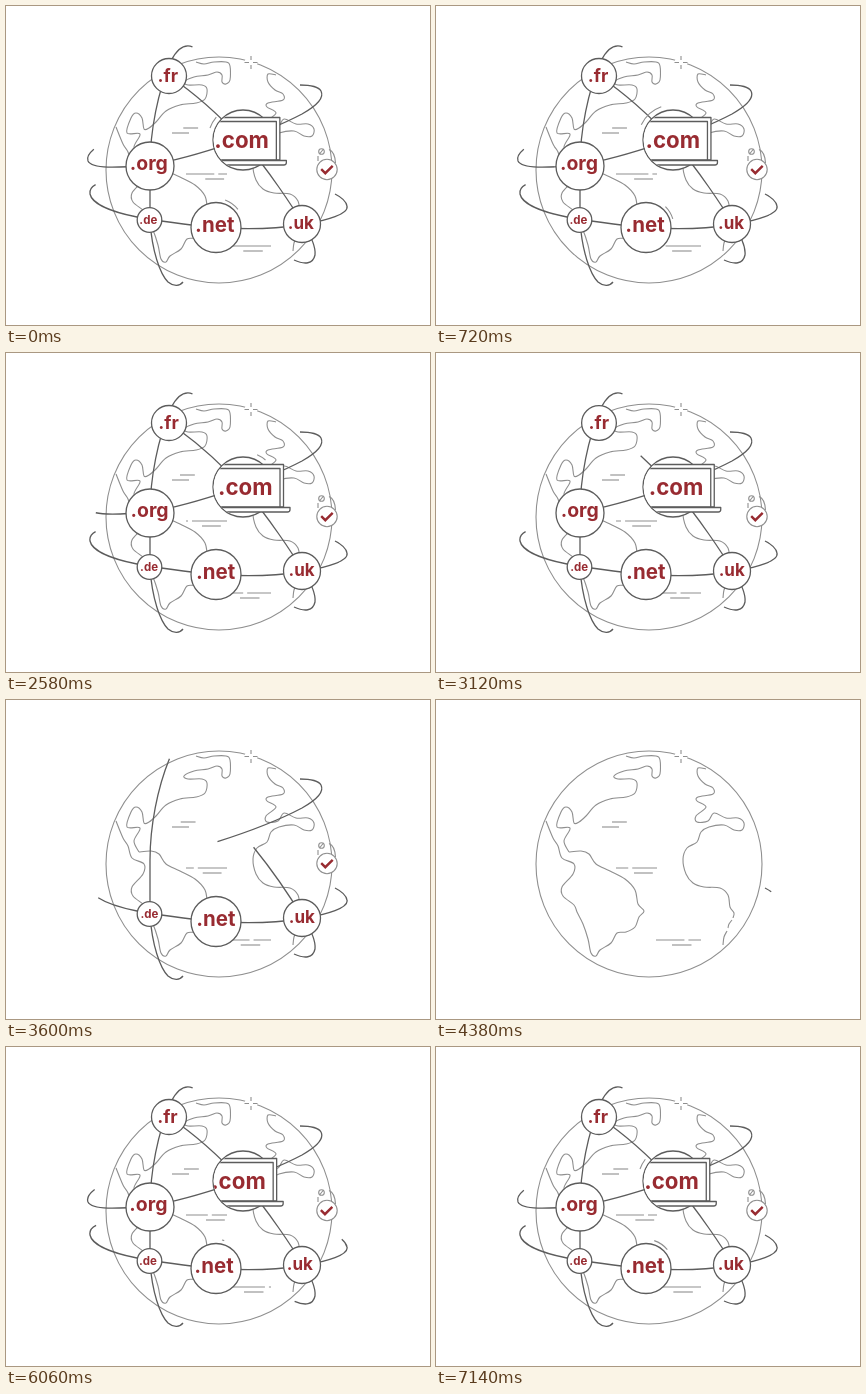
Recreate the animation shown at these times as an HTML page. Size 424 by 319 pixels, loop 7200 ms.

```html
<!DOCTYPE html>
<html lang="en">
<head>
<meta charset="utf-8">
<title>Domain globe</title>
<style>
html, body { margin: 0; width: 100%; height: 100%; overflow: hidden; background: #fff; }
svg { display: block; width: 100vw; height: 100vh; }
path, circle { fill: none; stroke-linejoin: round; }
.land { stroke: #8f8f8f; stroke-width: 1.1; }
.ink { stroke: #5c5c5c; stroke-width: 1.3; }
.disc { fill: #fff; }
text { font-family: Inter, "Open Sans", sans-serif; font-weight: 700; fill: #982b31; text-anchor: middle; }
.tick { stroke: #982b31; stroke-width: 2.4; stroke-linejoin: miter; }
</style>
</head>
<body>
<svg id="stage" viewBox="0 0 424 319"></svg>
<script>
const LOOP = 7200, RESTART = 4400;
const stage = document.getElementById('stage');

function set(node, attrs) {
  for (const key in attrs) node.setAttribute(key, attrs[key]);
}
function add(tag, attrs, parent = stage) {
  const node = document.createElementNS('http://www.w3.org/2000/svg', tag);
  set(node, attrs);
  return parent.appendChild(node);
}

const clamp = v => Math.max(0, Math.min(1, v));
const progress = (t, from, length) => clamp((t - from) / length);
const smooth = v => v * v * (3 - 2 * v);
const easeIn = v => v * v;
const easeOut = v => 1 - (1 - v) ** 3;

// Smooth curve through "x,y x,y ..." points.
function spline(list) {
  const p = list.split(' ').map(s => s.split(',').map(Number));
  let d = `M${p[0]}`;
  for (let i = 0; i < p.length - 1; i++) {
    const a = p[i - 1] || p[i], b = p[i], c = p[i + 1], e = p[i + 2] || c;
    const h1 = [0, 1].map(k => b[k] + (c[k] - a[k]) / 6);
    const h2 = [0, 1].map(k => c[k] - (e[k] - b[k]) / 6);
    d += `C${h1} ${h2} ${c}`;
  }
  return d;
}

// Show only the part of a path between two fractions.
function trim(path, start, end) {
  const len = path.getTotalLength(), span = (end - start) * len;
  path.style.display = span < 0.3 ? 'none' : '';
  set(path, { 'stroke-dasharray': `0 ${start * len} ${Math.max(0, span)} ${len * 2}` });
}

// Globe and land
add('circle', { cx: 213, cy: 164, r: 113, class: 'land' });
const coasts = {
  northAmerica: '190,56 198,58 208,56 220,56 224,60 224,74 220,78 216,76 216,69 211,66 202,69 188,71 178,76 182,79 196,79 201,83 199,93 190,97 174,99 160,105 150,116 143,122 138,123 136,112 130,107 125,112 121,127 134,128 128,141 133,152',
  southAmerica: '133,152 145,151 153,154 160,164 174,171 189,179 199,190 202,204 208,211 203,217 199,227 190,232 181,233 175,243 164,250 160,256 155,253 152,239 147,224 141,212 138,205 127,196 126,187 137,174 138,164 126,158 122,146 117,138 110,121',
  europeAfrica: '270,69 262,68 262,76 269,84 277,88 277,94 262,97 261,101 270,107 260,116 261,122 272,121 278,113 290,118 302,118 308,123 306,130 298,130 288,125 273,127 265,132 261,142 251,148 247,159 250,174 257,183 268,187 284,188 292,195 294,207 298,213 297,218',
  cape: '296,220 293,224 292,228',
  capeEnd: '291,231 288,237 287,245'
};
for (const name in coasts) add('path', { d: spline(coasts[name]), class: 'land' });

add('circle', { cx: 245, cy: 56.5, r: 6.5, class: 'disc' });
add('path', { class: 'land', d: 'M238.5 56.5h4.5M247 56.5h4.5M245 50v4M245 59v4' });

// Each patch of sea is a long line and a short one; a gap runs along the long line.
const waves = [[166, 127, 17, 176, 122], [180, 168, 41, 198, 173], [220, 240, 45, 236, 245]]
  .map(([x, y, len, x2, y2]) => ({
    len,
    long: add('path', { d: `M${x} ${y}h${len}`, class: 'land' }),
    short: add('path', { d: `M${x2} ${y2}h${12 + len / 6}`, class: 'land' })
  }));

// Lines draw themselves over "draw" ms, settle at "rest" and are erased from "out" to "until".
const orbits = [
  { d: 'M100 136C86 142 80 150 82 155C86 163 110 162 144 159C190 151 260 127 296 108C312 99 318 91 315 85C312 80 304 79 294 79',
    draw: 1650, rest: .045, out: 9100, until: 11500 },
  { d: 'M97 176C88 178 83 182 84 188C86 198 106 206 131 211C190 221 240 227 296 219C322 214 343 208 341 200C340 195 335 191 329 188',
    draw: 2370, rest: .025, out: 10480, until: 11595 },
  { d: 'M189 42C180 37 172 41 165 55C152 85 144 125 144 160V215C146 245 154 268 162 276C168 281 174 280 177 276',
    draw: 1750, rest: .01, out: 10400, until: 11560 },
  { d: 'M130 59C142 57 150 61 163 70C190 88 216 112 238 136C262 163 288 203 297 218C305 230 310 240 309 249C307 258 299 259 288 254',
    draw: 1950, rest: .12, out: 9300, until: 11560 }
];
for (const o of orbits) o.el = add('path', { d: o.d, class: 'ink' });

// Thin arcs that run around two of the nodes
const arcs = [
  { d: 'M204 122A35 35 0 0 1 259.5 107', from: 6700 },
  { d: 'M216 193A29 29 0 0 1 238 222', from: 5900 }
];
for (const a of arcs) a.el = add('path', { d: a.d, class: 'land' });

// Tag beside the badge
const tag = add('g', {});
add('circle', { cx: 315.5, cy: 145.5, r: 2.8, class: 'land' }, tag);
add('path', { d: 'M313.5 148L317.5 143M312 150v5M323 143.5Q329 146 329.5 157', class: 'land' }, tag);

const nodes = [
  { label: '.fr', x: 163, y: 70, r: 17.5, dy: 5.5, size: 18, from: 4500, gone: 10300 },
  { label: '.org', x: 144, y: 160, r: 24, dy: 4, size: 19.4, from: 4600, gone: 10350 },
  { label: '.com', x: 237, y: 134, r: 30, dy: 7.5, size: 22.3, from: 5020, gone: 10400, push: 18, drift: 1.36, laptop: true },
  { label: '.de', x: 143.5, y: 214, r: 12.3, dy: 3.5, size: 11.5, from: 4750, gone: 11050 },
  { label: '.net', x: 210, y: 221.5, r: 25, dy: 4.5, size: 20.5, from: 5110, gone: 11100 },
  { label: '.uk', x: 296, y: 218, r: 18.5, dy: 5.3, size: 17, from: 5340, gone: 11150 },
  { x: 321, y: 163.5, r: 10.2, from: 5000, gone: 11100, push: 12, drift: 0 }
];
const defs = add('defs', {});
nodes.forEach((n, i) => {
  const clip = add('clipPath', { id: 'clip' + i }, defs);
  n.mask = add('circle', { cx: n.x, cy: n.y }, clip);
  if (n.laptop) n.side = add('rect', { x: n.x, y: n.y - 40, height: 80 }, clip);
  n.group = add('g', {});
  n.disc = add('circle', { cx: n.x, cy: n.y, class: `disc ${n.label ? 'ink' : 'land'}` }, n.group);
  const inner = add('g', { 'clip-path': `url(#clip${i})` }, n.group);
  n.content = add('g', {}, inner);
  if (n.laptop) {
    add('path', { d: 'M190 154V111.5H274V154Z', class: 'ink disc' }, n.content);
    add('path', { d: 'M190 115.5H270.5V154', class: 'ink' }, n.content);
    add('path', { d: 'M190 154.5H280.5V156.5Q280.5 159 278 159H190', class: 'ink disc' }, n.content);
  }
  if (n.label) {
    const text = { x: n.x - 1.2, y: n.y + n.dy, 'font-size': n.size };
    add('text', text, n.content).textContent = n.label;
  } else {
    add('path', { d: 'M315.2 163.2L319.3 167.2L326.7 159.8', class: 'tick' }, n.content);
  }
});

function render(t) {
  // The cycle is counted from the moment the lines start to draw.
  const u = t < RESTART ? t + LOOP : t;

  for (const o of orbits) {
    const settled = o.rest * smooth(progress(u, 5340, 860));
    const erased = easeIn(progress(u, o.out, o.until - o.out));
    trim(o.el, settled + (1 - settled) * erased, easeOut(progress(u, RESTART, o.draw)));
  }
  for (const a of arcs) trim(a.el, progress(u, a.from + 1100, 2330), progress(u, a.from, 2660));

  for (const n of nodes) {
    const { push = n.r * 0.4, drift = 0.3 } = n;
    const grow = easeOut(progress(u, n.from, 560));
    const r = n.r * grow * (1 - smooth(progress(u, n.gone, 400)));
    n.group.style.display = r < 0.4 ? 'none' : '';
    set(n.disc, { r });
    set(n.mask, { r: Math.max(0, r - 0.6) });
    if (n.side) set(n.side, { width: 56 * r / n.r });
    const slide = drift * (u - LOOP) / 1000 - push * Math.exp((n.from - u) / (n.laptop ? 450 : 300));
    set(n.content, { transform: `translate(${slide} 0)` });
  }
  set(tag, { opacity: progress(u, 5450, 300) * (1 - progress(u, 11050, 300)) });

  const turn = t / LOOP;
  waves.forEach((w, i) => {
    const gap = (turn + 0.69 + i / 3 - 1 / 3) % 1 * w.len;
    if (i) set(w.long, { 'stroke-dasharray': `${gap} 4 ${w.len} 4` });
    const sway = 2 * Math.sin((turn - 0.61) * 2 * Math.PI);
    set(w.short, { transform: `translate(${sway} 0)` });
  });
}

const begin = performance.now();
function frame() {
  render((performance.now() - begin) % LOOP);
  requestAnimationFrame(frame);
}
frame();
</script>
</body>
</html>
```
